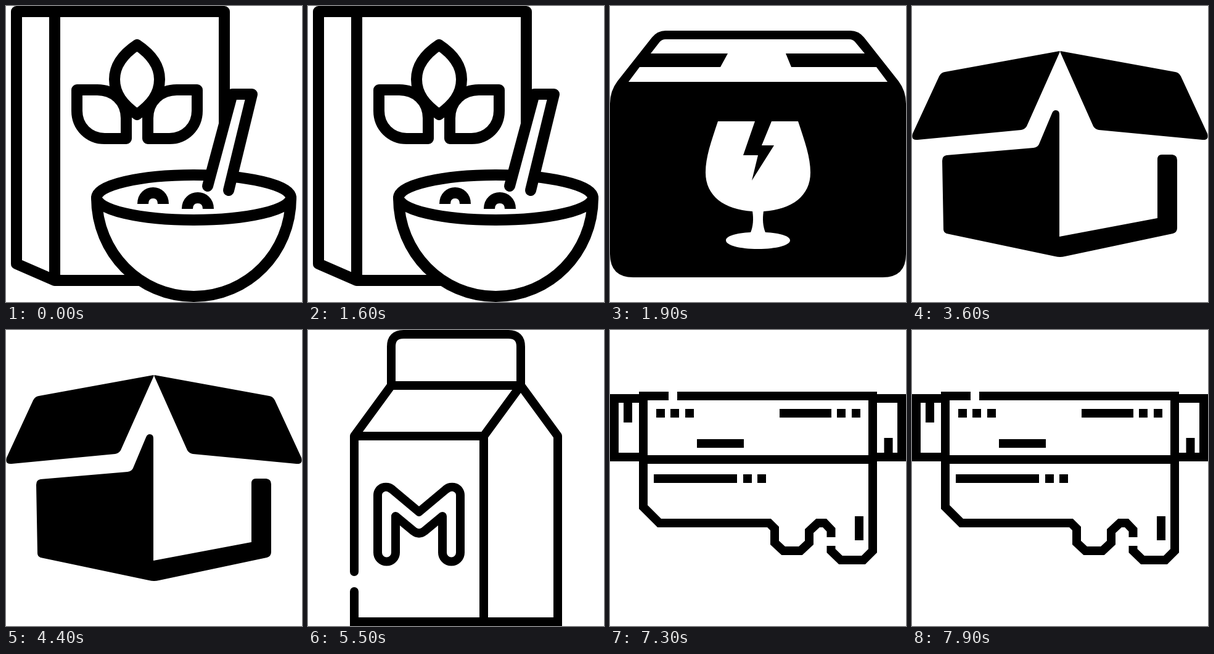
An HTML page that plays this animation: 480 by 480 pixels, repeating every 8000 ms.

```html
<!DOCTYPE html>
<html lang="en">
<head>
<meta charset="utf-8">
<title>Breakfast and box icons</title>
<style>
  html, body { margin: 0; width: 100%; height: 100%; overflow: hidden; background: #fff; }
  #stage { display: block; width: 100vw; height: 100vh; }
  .line { fill: none; stroke: #000; stroke-width: 14; }
  .thick { stroke-width: 18; }
  .round { stroke-linecap: round; stroke-linejoin: round; }
  .white { fill: #fff; }
  /* The icons sit side by side; the strip jumps one icon at a time. */
  #strip { animation: cut 8s step-end infinite; }
  @keyframes cut {
    0% { transform: translateX(0); }
    21.25% { transform: translateX(-480px); }
    45% { transform: translateX(-960px); }
    68.75% { transform: translateX(-1440px); }
    91.25%, 100% { transform: translateX(-1920px); }
  }
</style>
</head>
<body>
<svg id="stage" viewBox="0 0 480 480">
  <g id="strip">

    <!-- cereal -->
    <svg width="480" height="480">
      <g class="line thick round">
        <path d="M354 190V9H17V418L79 445H220M79 9V445"/>
        <path id="leaf" d="M195 174V215H160C135 215 115 196 115 170V136H148C174 136 195 154 195 182"/>
        <use href="#leaf" transform="translate(425 0) scale(-1 1)"/>
        <path class="white" d="M212.500 63C190 78 176 96 176 119C176 143 190 160 212.500 176C235 160 249 143 249 119C249 96 235 78 212.500 63Z"/>
        <path class="white" d="M147 311C147 400 217 471 304.500 471S462 400 462 311"/>
        <ellipse class="white" cx="304.500" cy="310.500" rx="157.500" ry="36.500"/>
        <path class="white" d="M327 292L367 143H399L361 299"/>
      </g>
      <g class="line thick">
        <path d="M222 321C222 297 255 297 255 321"/>
        <path d="M294 329C294 305 328 305 328 329"/>
      </g>
    </svg>

    <!-- fragile parcel -->
    <svg x="480" width="480" height="480">
      <path d="M90 40H390Q403 40 412 51L468 122Q480 138 480 158V402Q480 440 442 440H38Q0 440 0 402V158Q0 138 12 122L68 51Q77 40 90 40Z"/>
      <path class="white" d="M66 77L80 59Q84 54 90 54H388Q394 54 398 59L413 77H285L294 99H432L450 123H30L48 99H179L191 77Z"/>
      <path class="white" d="M175 187H235L216 242H240L230 283L266 226H246L262 187H305C316 220 325 245 325 270C325 308 295 330 249 333C247 345 248 358 252 367C275 368 292 373 292 380C292 388 270 394 240 394S188 388 188 380C188 373 205 368 228 367C232 358 233 345 231 333C185 330 155 308 155 270C155 245 164 220 175 187Z"/>
    </svg>

    <!-- open parcel -->
    <svg x="960" width="480" height="480">
      <path id="flap" d="M239.500 73L53 107Q47 108 44 114L1 207Q-2 218 9 217L177 201Q183 200 186 195L239.500 75Z"/>
      <use href="#flap" transform="translate(480 0) scale(-1 1)"/>
      <path d="M227 174Q229 169 233 169Q239 169 239 176V374L398 344V249Q398 241 405 241H422Q430 242 430 250V360Q430 367 423 369L248 406Q240 408 232 406L56 369Q51 367 51 362L49 251Q49 243 56 242L197 230Q204 229 206 224Z"/>
    </svg>

    <!-- milk carton -->
    <svg x="1440" width="480" height="480">
      <g class="line round">
        <path d="M135 90V27Q135 7 155 7H325Q345 7 345 27V90Z"/>
        <path d="M75 392V172L135 90M75 172H285L345 90L405 172V460M285 172V473M75 424V460"/>
        <path d="M113 268C113 256 127 250 137 259L180 295L223 259C233 250 247 256 247 268V361A14.500 14.500 0 0 1 218 361V302L189 326Q180 333 171 326L142 302V361A14.500 14.500 0 0 1 113 361Z"/>
      </g>
      <path class="line" d="M75 455V473H405V455"/>
    </svg>

    <!-- scroll -->
    <svg x="1920" width="480" height="480">
      <g class="line">
        <path d="M95 107H54V287L80 313H258L267 322V345L281 358H309L323 345V326L337 313H348L358.500 324V336"/>
        <path d="M109 107H426V358L411 373H374L358.500 358V350M54 210H426"/>
        <path d="M54 111H7V206H54M426 111H473V206H426M29 111V150M451.500 175V206"/>
        <path d="M75 135h14m9 0h14m10 0h14M275 135h84m9 0h14m10 0h14M141 184h76M71 241h135m10 0h14m9 0h14M404 302v39"/>
        <path d="M337 318Q343 316 349 318" stroke-width="4"/>
      </g>
    </svg>

  </g>
</svg>
</body>
</html>
```
